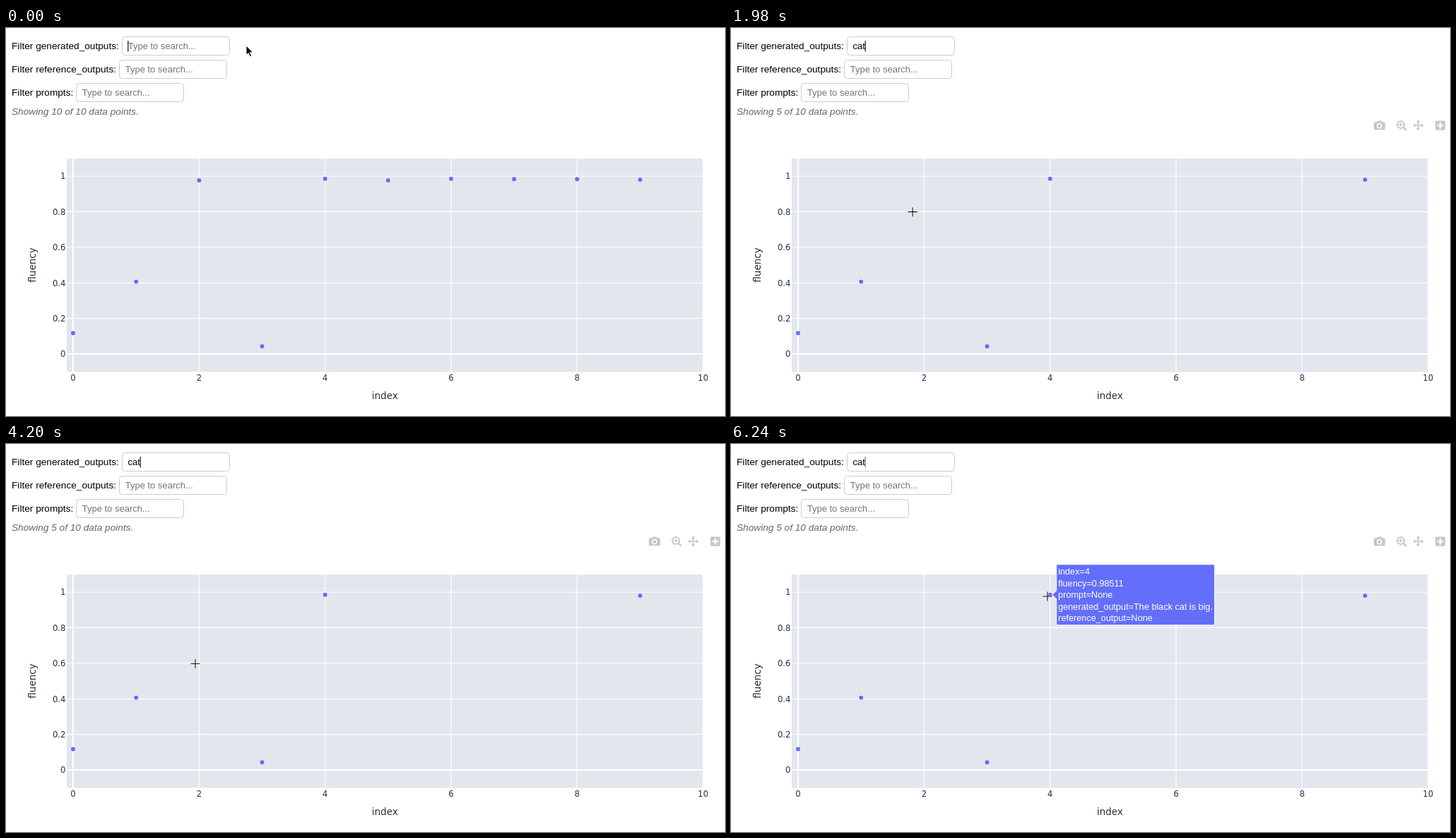
These frames come from a looping animation (1018 by 550 pixels, 6300 ms). An HTML page:

```html
<!DOCTYPE html>
<html lang="en">
<head>
<meta charset="utf-8">
<title>Filtered scatter plot</title>
<style>
  html, body { margin: 0; width: 100%; height: 100%; overflow: hidden; background: #fff; }
  svg { display: block; width: 100%; height: 100%; }
  .ui { font: 13.66px "Liberation Sans", Arial, sans-serif; }
  .field { font-size: 13.01px; }
  .hint { fill: #757575; }
  .status { font-style: italic; fill: #666; }
  .axis { font: 11.7px "DejaVu Sans", Verdana, sans-serif; fill: #2a3040; }
  .title { font-size: 13.5px; text-anchor: middle; }
  .tip { font: 12.69px "Liberation Sans", Arial, sans-serif; fill: #fff; }
</style>
</head>
<body>
<svg id="stage" viewBox="0 0 1018 550"></svg>
<script>
const LOOP = 6300;
const BLUE = '#636efa';
const stage = document.getElementById('stage');

function add(tag, attrs = {}, parent = stage, text = '') {
  const node = document.createElementNS('http://www.w3.org/2000/svg', tag);
  for (const key in attrs) node.setAttribute(key, attrs[key]);
  node.textContent = text;
  parent.appendChild(node);
  return node;
}
const label = (x, y, text, cls, more = {}, parent = stage) =>
  add('text', { x, y, class: cls, ...more }, parent, text);
const show = (node, visible) => node.setAttribute('opacity', +visible);
const clamp = v => Math.max(0, Math.min(1, v));
const px = i => 95 + 89.2 * i;
const py = v => 462 - 252 * v;

// Filter form
const hints = ['generated_outputs', 'reference_outputs', 'prompts'].map((name, row) => {
  const x = [164.5, 160.5, 99.5][row], y = 12.5 + 32.8 * row;
  label(8, y + 17.5, `Filter ${name}:`, 'ui');
  add('rect', { x, y: Math.floor(y) + 0.5, width: 152, height: 26, rx: 4, fill: '#fff', stroke: '#ccc' });
  return label(x + 8.2, y + 17.5, 'Type to search...', 'ui field hint');
});
const typed = label(172.5, 30, '', 'ui field');
const caret = add('rect', { y: 18, width: 1.1, height: 15.5 });
const status = label(8, 123.2, '', 'ui status');

// Chart
add('rect', { x: 86, y: 185, width: 901, height: 302.5, fill: '#e2e7ee' });
const grid = (x1, y1, x2, y2, zero) =>
  add('line', { x1, y1, x2, y2, stroke: '#fff', 'stroke-width': zero ? 2 : 1.1 });
for (let i = 0; i <= 10; i += 2) {
  grid(px(i), 185, px(i), 487.5, !i);
  label(px(i), 500.3, i, 'axis', { 'text-anchor': 'middle' });
}
for (let i = 0; i <= 5; i++) {
  const y = py(i / 5);
  grid(86, y, 987, y, !i);
  label(84.5, y + 4.3, i / 5, 'axis', { 'text-anchor': 'end' });
}
label(536.5, 526.3, 'index', 'axis title');
label(0, 0, 'fluency', 'axis title', { transform: 'translate(42 336) rotate(-90)' });

const scores = [0.117, 0.4063, 0.976, 0.043, 0.98511, 0.976, 0.985, 0.983, 0.983, 0.98];
const matches = [0, 1, 3, 4, 9];
const dots = scores.map((v, i) => add('circle', { cx: px(i), cy: py(v), r: 2.95, fill: BLUE }));

// Chart toolbar
const toolbar = add('g', { fill: '#c7c7c7', stroke: 'none' });
add('path', { 'fill-rule': 'evenodd', d: `M912 133.3h2.6l1-1.8h5.2l1 1.8h2.6q1.8 0 1.8 1.8v7.4q0 1.8-1.8 1.8h-12.4
  q-1.8 0-1.8-1.8v-7.4q0-1.8 1.8-1.8z M918.2 134.6a4 4 0 1 0 .01 0z M918.2 136.2a2.4 2.4 0 1 1-.01 0z` }, toolbar);
add('path', { fill: 'none', stroke: '#c7c7c7', 'stroke-width': 2.2,
  d: 'M953.4 137a5 5 0 1 0-10 0a5 5 0 1 0 10 0z M952 140.6l4.2 4.2' }, toolbar);
add('path', { fill: 'none', stroke: '#c7c7c7', 'stroke-width': 1.6,
  d: 'M945.6 137h5.6M948.4 134.2v5.6' }, toolbar);
const arm = 'M972.2 138v-4.2h-2l2.8-3.4l2.8 3.4h-2v4.2z';
for (let a = 0; a < 360; a += 90) add('path', { d: arm, transform: `rotate(${a} 973 138)` }, toolbar);
add('path', { 'fill-rule': 'evenodd', d: `M999 131.4h10.6q1.6 0 1.6 1.6v10.2q0 1.6-1.6 1.6h-10.6q-1.6 0-1.6-1.6v-10.2
  q0-1.6 1.6-1.6z M1003.1 133.8v3.1h-3.1v2.4h3.1v3.1h2.4v-3.1h3.1v-2.4h-3.1v-3.1z` }, toolbar);

// Hover labels
function makeTip(index, fluency, output, width) {
  const group = add('g');
  const x = px(index) + 9, y = py(scores[index]);
  add('path', { d: `M${x - 6} ${y}l6-6V${y - 43}h${width}v86H${x}V${y + 6}z`, fill: BLUE, stroke: '#fff' }, group);
  [`index=${index}`, `fluency=${fluency}`, 'prompt=None', `generated_output=${output}`, 'reference_output=None']
    .forEach((line, i) => label(x + 2.4, y - 28.5 + 16.5 * i, line, 'tip', {}, group));
  return { index, x: px(index), y, group };
}
const tips = [
  makeTip(1, '0.4063001', 'Black cat the.', 188.5),
  makeTip(4, '0.98511', 'The black cat is big.', 224)
];

// Pointers
const arrow = add('path', { d: 'M0 0V14.2L3.3 11.2L5.6 16.4L7.9 15.4L5.7 10.3H10.2Z',
  fill: '#000', stroke: '#fff', 'stroke-width': 1.1 });
const cross = add('g', { fill: 'none' });
const plus = 'M-6.5 0H6.5M0-6.5V6.5';
add('path', { d: plus, stroke: '#fff', 'stroke-opacity': 0.6, 'stroke-width': 2.6 }, cross);
add('path', { d: plus, stroke: '#111', 'stroke-width': 1.1 }, cross);

// Pointer stops: time, x, y
const stops = [
  [0, 340, 24.5], [1440, 340, 24.5], [1740, 296, 185], [2100, 238, 298], [2520, 200.5, 345.5],
  [2700, 184, 360], [3760, 184, 360], [4200, 268, 311.5], [4430, 269, 311], [5060, 448, 216], [LOOP, 448, 216]
];
function pointerAt(t) {
  const k = stops.findIndex((s, i) => i && t <= s[0]);
  const [t0, x0, y0] = stops[k - 1], [t1, x1, y1] = stops[k];
  let u = (t - t0) / (t1 - t0);
  if (t0 >= 3700) u = u * u * (3 - 2 * u);
  return [x0 + (x1 - x0) * u, y0 + (y1 - y0) * u];
}

// The caret stays lit while typing, then blinks with soft edges.
function caretOpacity(t) {
  if (t < 1440) return 1;
  const u = (t - 1260) % 980;
  return u < 470 ? 1 - clamp(u / 190) : clamp((u - 470) / 190);
}

const keyTimes = [300, 480, 660];

function render(t) {
  const count = keyTimes.filter(k => t >= k).length;
  const filtered = count === 3;
  typed.textContent = 'cat'.slice(0, count);
  show(hints[0], !count);
  caret.setAttribute('x', count ? 172.3 + typed.getComputedTextLength() : 172.3);
  caret.setAttribute('opacity', caretOpacity(t));
  status.textContent = `Showing ${filtered ? 5 : 10} of 10 data points.`;
  dots.forEach((dot, i) => show(dot, !filtered || matches.includes(i)));

  const [x, y] = pointerAt(t);
  const visible = t < keyTimes[0] || t >= 1440;
  const inPlot = y >= 185;
  for (const node of [arrow, cross]) node.setAttribute('transform', `translate(${x} ${y})`);
  show(arrow, visible && !inPlot);
  show(cross, visible && inPlot);
  toolbar.setAttribute('opacity', clamp((t - 1650) / 300));
  for (const tip of tips) show(tip.group, Math.hypot(x - tip.x, y - tip.y) < 20);
}

const start = performance.now();
function tick() {
  render((performance.now() - start) % LOOP);
  requestAnimationFrame(tick);
}
render(0);
requestAnimationFrame(tick);
</script>
</body>
</html>
```
